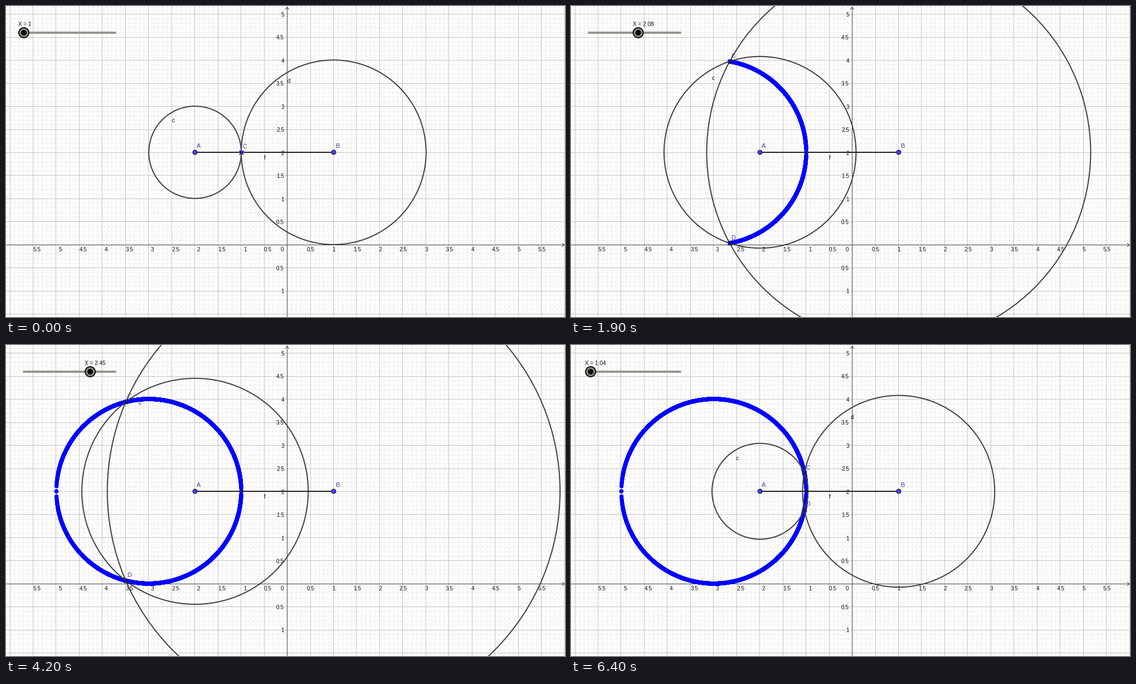
A matplotlib script that plays this animation: 1003x559 px, repeating every 6.5 s.

```python
import numpy as np
import matplotlib.pyplot as plt
from matplotlib.animation import FuncAnimation
from matplotlib.patches import Circle

W, H, DPI = 1003, 559, 64
PX = 72 / DPI                 # points per pixel
OX, OY, UNIT = 505.0, 428.8, 82.92
FRAMES, STEP_MS = 65, 100
BLUE, LABEL = "#0000ff", "#3d3d9e"

plt.rcParams["font.family"] = "Liberation Sans"
plt.rcParams["path.simplify"] = False
fig = plt.figure(figsize=(W / DPI, H / DPI), dpi=DPI, facecolor="#fdfdfc")
ax = fig.add_axes([0, 0, 1, 1])
ax.set_xlim(0, W)
ax.set_ylim(H, 0)
ax.axis("off")


def px(x):
    return OX + UNIT * x


def py(y):
    return OY - UNIT * y


def pixel(v):
    """Centre of the pixel that holds v."""
    return np.floor(v) + 0.5


def num(v):
    return f"{v:.2f}".rstrip("0").rstrip(".")


def text(x, y, s, size=10, color="#111111", ha="center", z=4):
    return ax.text(x, y, s, fontsize=size * PX, color=color, ha=ha,
                   va="baseline", zorder=z, clip_on=True)


def line(xs, ys, color, width, z, **kw):
    return ax.plot(xs, ys, color=color, lw=width * PX, zorder=z, **kw)[0]


def disc(x, y, r, face, edge, width, z):
    return ax.add_patch(Circle((x, y), r, fc=face, ec=edge, lw=width * PX, zorder=z))


def grid(step, color, z, style):
    xs = np.arange(round(-6.1 / step), round(6.1 / step) + 1) * step
    ys = np.arange(round(-1.6 / step), round(5.2 / step) + 1) * step
    kw = dict(colors=color, lw=PX, zorder=z, linestyles=style, snap=False)
    ax.vlines(pixel(px(xs) - 0.4), 0, H, **kw)
    ax.hlines(pixel(py(ys) + 0.5), 0, W, **kw)


def draw_axes():
    x, y = pixel(OX - 0.4), pixel(OY + 0.5)
    for xs, ys in (([0, 1002], [y, y]), ([x, x], [2, H]),
                   ([998, 1002, 998], [y - 3, y, y + 3]),
                   ([x - 3, x, x + 3], [6, 2, 6])):
        line(xs, ys, "#404040", 1, 3, snap=False)
    text(495.5, 441, "0")
    for k in range(-11, 12):
        if k:
            text(px(k / 2) + (6.5 if k < 0 else 0.5), 441, num(abs(k) / 2))
    for k in range(-2, 11):
        if k:
            text(499, py(k / 2) + 4.7, num(abs(k) / 2), ha="right")


def crossing(x):
    """Offsets from A where radius x around A meets radius 2x around B."""
    u = 1.5 - x * x / 2
    return u, np.sqrt(np.maximum(x * x - u * u, 0))


def slider_value(i):
    x = 3 - 0.0641 * abs(i - 33.4)
    if i < 33:
        x = max(x, 1 + 0.015 * i)
    return round(x, 3)


grid(0.1, "#e6e6e6", 1, (0, (4, 3)))
grid(0.5, "#c3c3c0", 2, "solid")
draw_axes()

A, B = (px(-2), py(2)), (px(1), py(2))
line([A[0], B[0]], [A[1], B[1]], "#202020", 2, 7)
for (x, y), name in ((A, "A"), (B, "B")):
    disc(x, y, 4, "#4040f0", "#101020", 1, 9)
    text(x + 6.5, y - 7.5, name, 11, LABEL)
text(464, 276, "f")

line([32, 196], [48, 48], "#96968f", 4, 8, solid_capstyle="round")
knob = disc(32, 48, 9, "#8c8c82", "#101010", 2, 9)
core = disc(32, 48, 5, "#000000", "none", 0, 10)
readout = text(22, 35.5, "", ha="left", z=10)

rings = [disc(*c, 1, "none", "#404040", 2, 6) for c in (A, B)]
ring_names = [text(0, 0, s) for s in "cd"]
trace = line([], [], BLUE, 7.5, 5, solid_capstyle="round")
marks = line([], [], "#10107a", 0, 8, ls="", marker="x", ms=7 * PX, mew=1.8 * PX)
point_names = [text(0, 0, s, 11, LABEL) for s in "CD"]


def dots(xs, ys):
    """Round-capped specks, so each dot keeps its subpixel place."""
    gap = np.full_like(xs, np.nan)
    return (np.column_stack([xs, xs + 0.01, gap]).ravel(),
            np.column_stack([ys, ys, gap]).ravel())


def update(i):
    x = slider_value(i)

    for ring, name, r in zip(rings, ring_names, (x, 2 * x)):
        ring.set_radius(r * UNIT)
        cx, cy = ring.center
        name.set_position((cx + 2.2 - 41.4 * r, cy + 17.5 - 71 * r))

    u, v = crossing(x)
    cx = px(u - 2)
    ys = [py(2 + v), py(2 - v)]
    marks.set_data([cx, cx], ys)
    marks.set_markeredgecolor("#1818c8" if x == 1 else "#10107a")
    for name, y in zip(point_names, ys):
        name.set_position((cx + 6.5, y - 6.5))
    point_names[1].set_visible(x > 1)

    top = 3 if i > 33 else x
    tu, tv = crossing(np.arange(1000, round(top * 1000) + 1) / 1000)
    trace.set_data(*dots(px(np.r_[tu, tu] - 2), py(2 + np.r_[tv, -tv])))
    trace.set_visible(i > 0)

    kx = 32 + 82.2 * (x - 1)
    knob.center = core.center = (kx, 48)
    readout.set_position((kx - 10, 35.5))
    readout.set_text("X = " + num(x))
    return []


anim = FuncAnimation(fig, update, frames=FRAMES, interval=STEP_MS,
                     init_func=lambda: update(0), repeat=True, repeat_delay=0)
plt.show()
```
